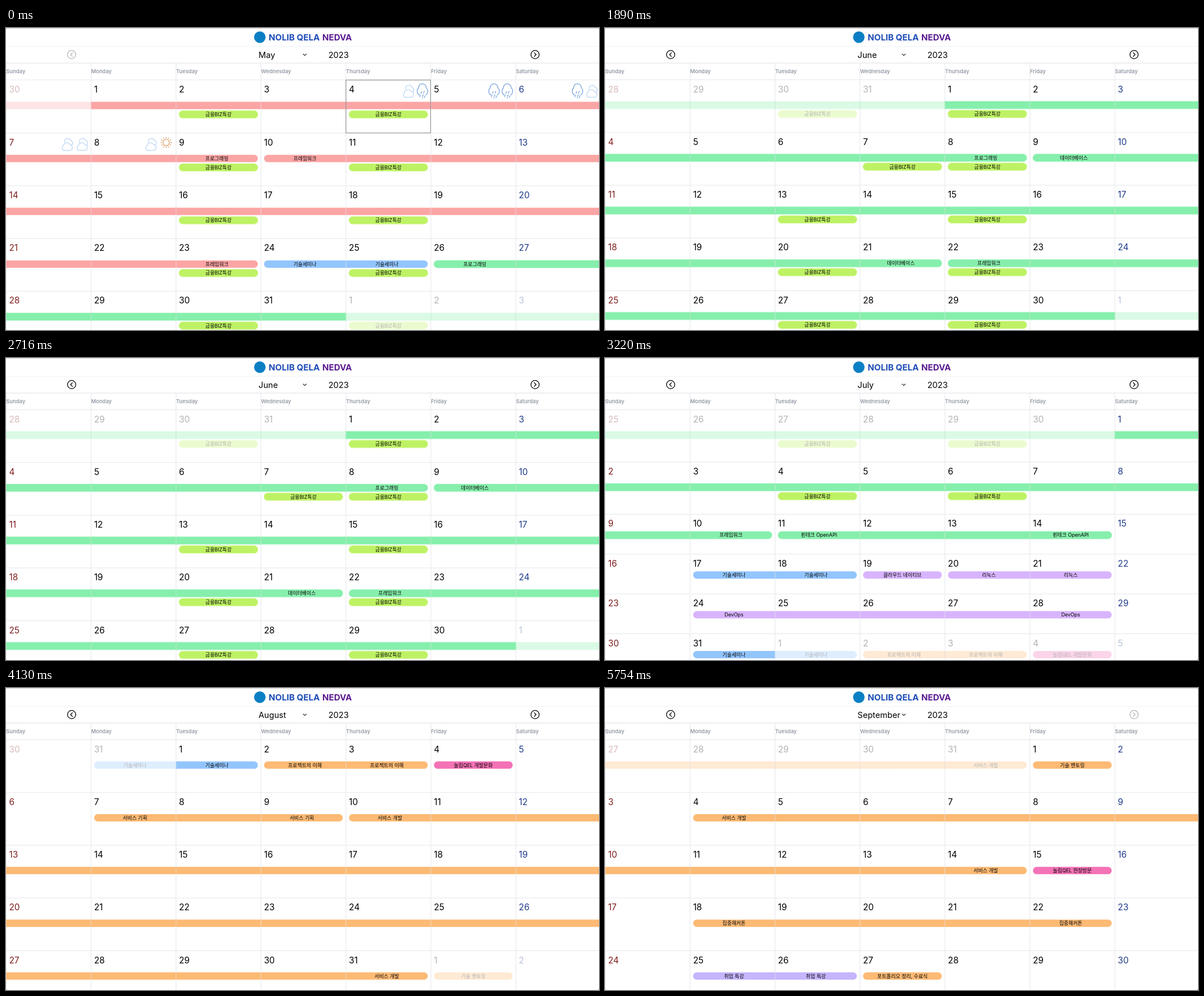
These frames come from a looping animation (1048x534 px, 6.23 s). An HTML page:

```html
<!DOCTYPE html>
<html lang="ko">
<head>
<meta charset="utf-8">
<title>Calendar</title>
<style>
html, body { margin: 0; width: 100%; height: 100%; overflow: hidden; background: #777; }
#stage { position: relative; width: 1048px; height: 534px; overflow: hidden; background: #fff; border-radius: 2px; }
#strip { position: absolute; top: 0; left: 0; animation: flip 6230ms step-end infinite; }
svg { display: block; }
text { font-family: Inter, "Noto Sans CJK KR", "Noto Sans CJK", sans-serif; fill: #000; }
.day { font-size: 15.3px; }
.label { font-size: 8.9px; text-anchor: middle; }
.week { font-size: 9.3px; font-weight: 600; fill: #959ba6; }
.brand { font-size: 15.1px; font-weight: 700; fill: #1e4db7; }
.brand .alt { fill: #5b1b90; }
.nav { font-size: 14.6px; }
.line { fill: none; stroke: #e5e7eb; }
.icon { fill: none; stroke-width: 1.4; stroke-linecap: round; stroke-linejoin: round; }
@keyframes flip {
  0% { transform: translateY(0); }
  30.337% { transform: translateY(-534px); }
  51.685% { transform: translateY(-1068px); }
  66.292% { transform: translateY(-1602px); }
  80.898% { transform: translateY(-2136px); }
}
</style>
</head>
<body>
<div id="stage"><div id="strip"></div></div>
<script>
const W = 1048, H = 534, COL = 150.14;
const WEEK = ['Sunday', 'Monday', 'Tuesday', 'Wednesday', 'Thursday', 'Friday', 'Saturday'];
const C = {
  red: '#fca5a5', lime: '#bef264', green: '#86efac', blue: '#93c5fd',
  purple: '#d8b4fe', orange: '#fdba74', pink: '#f472b6', violet: '#c4b5fd'
};
const LECTURE = '금융BIZ특강', CODE = '프로그래밍', FRAME = '프레임워크', SEMINAR = '기술세미나',
  DATA = '데이터베이스', BUILD = '서비스 개발', MENTOR = '기술 멘토링';

// Events: first cell, last cell, colour, label. Cells count from the top left.
const MONTHS = [
  { name: 'May', prev: 30, lead: 1, days: 31, rows: [91.8, 185.5, 279, 372.2, 465.3], gap: 38.7,
    lectures: [2, 4, 9, 11, 16, 18, 23, 25, 30, 32], today: 4,
    weather: [[711, 111, 'cloud'], [736, 111, 'rain'], [862.5, 111, 'rain'], [886, 111, 'rain'],
      [1010, 111, 'rain'], [1035, 111, 'cloud'], [108, 205, 'cloud'], [134.5, 205, 'cloud'],
      [256, 205, 'cloud'], [283, 202.5, 'sun']],
    events: [[-1, 9, 'red', CODE], [10, 23, 'red', FRAME], [24, 25, 'blue', SEMINAR], [26, 99, 'green', CODE]] },
  { name: 'June', prev: 31, lead: 4, days: 30, rows: [91.5, 184.7, 278, 371.2, 464.5], gap: 38.3,
    lectures: [2, 4, 10, 11, 16, 18, 23, 25, 30, 32],
    events: [[-1, 11, 'green', CODE], [12, 24, 'green', DATA], [25, 99, 'green', FRAME]] },
  { name: 'July', prev: 30, lead: 6, days: 31, rows: [91.5, 183.8, 276.3, 346.8, 417.1, 487.5], gap: 38.2,
    lectures: [2, 4, 9, 11],
    events: [[-1, 15, 'green', FRAME], [16, 19, 'green', '핀테크 OpenAPI'], [22, 23, 'blue', SEMINAR],
      [24, 24, 'purple', '클라우드 네이티브'], [25, 26, 'purple', '리눅스'], [29, 33, 'purple', 'DevOps'],
      [36, 37, 'blue', SEMINAR], [38, 39, 'orange', '프로젝트의 이해'], [40, 40, 'pink', '놀립QEL 개발문화']] },
  { name: 'August', prev: 31, lead: 2, days: 31, rows: [91.5, 184.7, 278, 371.2, 464.5], gap: 38.3,
    lectures: [],
    events: [[1, 2, 'blue', SEMINAR], [3, 4, 'orange', '프로젝트의 이해'], [5, 5, 'pink', '놀립QEL 개발문화'],
      [8, 10, 'orange', '서비스 기획'], [11, 32, 'orange', BUILD], [33, 33, 'orange', MENTOR]] },
  { name: 'September', prev: 31, lead: 5, days: 30, rows: [91.5, 184.7, 278, 371.2, 464.5], gap: 38.3,
    lectures: [],
    events: [[-1, 4, 'orange', BUILD], [5, 5, 'orange', MENTOR], [8, 18, 'orange', BUILD],
      [19, 19, 'pink', '놀립QEL 현장방문'], [22, 26, 'orange', '집중해커톤'],
      [29, 30, 'violet', '취업 특강'], [31, 31, 'orange', '포트폴리오 정리, 수료식']] }
];

const text = (x, y, cls, s) => `<text x="${x}" y="${y}" class="${cls}">${s}</text>`;
const line = (d, style = '') => `<path class="line" d="${d}" style="${style}"/>`;

const ICONS = {
  cloud: () => `<g stroke="#c3daf5"><path d="M-5 11.5A4.6 4.6 0 0 1-6.5 3A6 6 0 0 1 4.8 1.2A5.2 5.2 0 0 1 4.6 11.5Z"/>
    <path d="M-4.6-3.2A5.6 5.6 0 0 1 6-6.4A5 5 0 0 1 7.6 2.6"/></g>`,
  rain: () => `<g stroke="#82ace0"><path d="M-5.5 7.5C-10.5 5-10-3-7-4.5C-7-15 6.5-15 7-4.5C10.5-2.5 10 5 6 7.5"/>
    <path d="M-1.5 1.5l-1 3M3 1l-1 3M-3.5 7.5l-1.2 3.2M1.5 7l-1.2 3.2M4.5 9l-1 3M0 12l-.4 1"/></g>`,
  sun: () => {
    let rays = '';
    for (let a = 0; a < 360; a += 30) rays += `<path d="M0-7.8V-9.3" transform="rotate(${a})"/>`;
    return `<g stroke="#dfa878"><circle r="5.6"/>${rays}</g>`;
  }
};

function bar(cell, [first, last, colour, label], x, y) {
  const start = cell === first, end = cell === last;
  const l = x + (start ? 5.6 : 0), r = x + (end ? 144.8 : COL);
  const a = start ? 6.5 : 0, b = end ? 6.5 : 0;
  const shape = `M${l + a} ${y}H${r - b}` + (b ? `a6.5 6.5 0 0 1 0 13` : 'v13') +
    `H${l + a}` + (a ? `a6.5 6.5 0 0 1 0-13` : 'v-13') + 'Z';
  const glow = colour === 'lime' || colour === 'green'
    ? `<path d="${shape}" fill="none" stroke="${C[colour]}" stroke-width="2" opacity=".35"/>` : '';
  return glow + `<path d="${shape}" fill="${C[colour]}"/>` +
    (start ? '' : line(`M${x + .2} ${y}v13`, 'opacity:.55')) +
    (start || end ? text((l + r) / 2, y + 9.7, 'label', label) : '');
}

function arrow(x, dir, off) {
  return `<g class="icon" stroke="#000" transform="translate(${x} 47)scale(${dir} 1)" opacity="${off ? .3 : 1}">
    <circle r="7.3" stroke-width="1.3"/><path d="M-1.4-3.4L1.8 0L-1.4 3.4" stroke-width="1.3"/></g>`;
}

function header(m) {
  return line('M0 .5H1048', 'stroke:#cfcfcf') + line('M0 32.5H1048', 'stroke:#f1f2f4') +
    line('M0 62H1048', 'stroke:#dfe1e5') +
    `<circle cx="448.6" cy="16.3" r="10.2" fill="#0b7fc4"/>` +
    text(464.3, 22, 'brand', 'NOLIB QELA <tspan class="alt" x="559">NEDVA</tspan>') +
    arrow(116, -1, m === MONTHS[0]) + arrow(935, 1, m === MONTHS[4]) +
    text(446.3, 53, 'nav', m.name) + text(569.7, 53, 'nav', '2023') +
    `<path class="icon" stroke="#222" style="stroke-width:1.1" d="M525.2 46l2.8 2.6l2.8-2.6"/>` +
    WEEK.map((d, i) => text(i * COL + .3, 80.3, 'week', d)).join('');
}

function month(m) {
  let out = header(m);
  for (let i = 0; i < 7; i++) out += line(`M${i * COL + .2} 62V534`);
  m.rows.forEach(y => out += line(`M0 ${y}H1048`));

  for (let cell = 0; cell < m.rows.length * 7; cell++) {
    const col = cell % 7, row = cell / 7 | 0, x = col * COL, top = m.rows[row];
    const n = cell - m.lead + 1, outside = n < 1 || n > m.days;
    const date = n < 1 ? n + m.prev : n > m.days ? n - m.days : n;
    const ink = col === 0 ? '#7f1d1d' : col === 6 ? '#1e3a8a' : '#000';
    const short = m.name === 'July' && row > 1;
    const y = top + (short ? 30.4 : m.gap);
    out += `<g opacity="${outside ? .3 : 1}">` +
      `<text class="day" x="${x + 5.5}" y="${top + 22}" style="fill:${ink}">${date}</text>`;
    m.events.filter(e => cell >= e[0] && cell <= e[1]).forEach(e => out += bar(cell, e, x, y));
    if (m.lectures.includes(cell)) out += bar(cell, [cell, cell, 'lime', LECTURE], x, y + 15.8);
    out += '</g>';
  }

  if (m.today) out += `<rect x="${m.today * COL + .2}" y="92" width="149.6" height="93.6" fill="none" stroke="#8d8d8d" stroke-width="1.1"/>`;
  (m.weather || []).forEach(([x, y, kind]) =>
    out += `<g class="icon" transform="translate(${x} ${y})">${ICONS[kind]()}</g>`);
  return `<svg width="${W}" height="${H}" viewBox="0 0 ${W} ${H}">${out}</svg>`;
}

document.getElementById('strip').innerHTML = MONTHS.map(month).join('');
</script>
</body>
</html>
```
